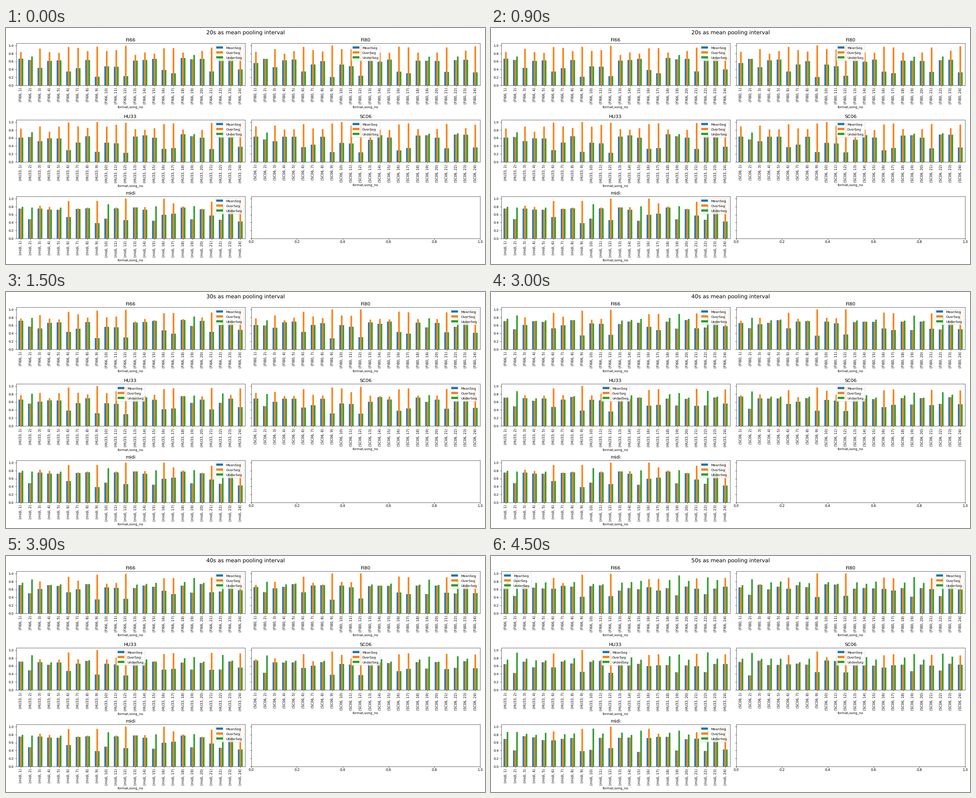
A matplotlib script for the animation above (6000 ms loop, 1064x527 px).

```python
import matplotlib.pyplot as plt
import numpy as np
from matplotlib.animation import FuncAnimation

W, H, DPI = 1064, 527, 53.2
LEFTS, TOPS = (22.5, 544.5), (34.5, 205.5, 376.5)
AX_W, AX_H = 508.5, 93.5
STEPS = 4
SONGS = np.arange(1, 25)
SERIES = ("MeanSeg", "OverSeg", "UnderSeg")

# Song types: (songs, (over, under) at 20s, (over, under) at 50s).
# The first entry of each list covers every song not named later.
RECORDED = [
    (SONGS, (.83, .64), (.64, .79)),
    ((3, 7, 10, 11), (.90, .46), (.72, .72)),
    ((6, 16, 17, 21, 24), (.95, .34), (.88, .61)),
    ((9, 12), (.99, .22), (.99, .42)),
    ((2, 19, 22), (.64, .72), (.44, .91)),
]
MIDI = [
    (SONGS, (.77, .75), (.71, .82)),
    ((6, 16, 17, 21), (.94, .60), (.88, .72)),
    ((9, 12, 24), (.99, .43), (.99, .43)),
    ((2, 10, 15, 19, 22), (.49, .83), (.41, .92)),
]

# Legend place at each step: left, center or right.
LEGEND = {"FI66": "rrrl", "FI80": "crrr", "HU33": "rccc",
          "SC06": "crcc", "midi": "rrrr"}
PANELS = list(LEGEND)
PLACES = {"l": "upper left", "c": "upper center", "r": "upper right"}


def scores(index, step):
    is_midi = PANELS[index] == "midi"
    # Midi holds still until the last interval.
    progress = step // (STEPS - 1) if is_midi else step / (STEPS - 1)
    data = np.empty((2, len(SONGS)))
    for songs, first, last in MIDI if is_midi else RECORDED:
        first, last = np.array(first), np.array(last)
        value = first + (last - first) * progress
        data[:, np.array(songs) - 1] = value[:, None]
    data += np.random.default_rng(index).normal(0, .03, data.shape)
    over, under = np.clip(data, 0, 1)
    return np.minimum(over, under), over, under


def add_axes(index):
    row, col = divmod(index, 2)
    return fig.add_axes([LEFTS[col] / W, 1 - (TOPS[row] + AX_H) / H,
                         AX_W / W, AX_H / H])


def style_y(ax, index):
    ax.set_ylim(0, 1.05)
    ax.set_yticks(np.arange(6) / 5)
    ax.tick_params(axis="y", labelleft=index % 2 == 0)


def draw_panel(ax, index, step):
    name = PANELS[index]
    ax.clear()
    width = 0.5 / 3
    for k, (label, values) in enumerate(zip(SERIES, scores(index, step))):
        ax.bar(SONGS + (k - 1) * width, values, width, label=label,
               snap=False)
    ax.set_xlim(0.5, 24.5)
    ax.set_xticks(SONGS, [f"({name}, {n})" for n in SONGS], rotation=90)
    style_y(ax, index)
    ax.set_xlabel("format,song_no")
    ax.set_title(name, fontsize=14)
    ax.legend(loc=PLACES[LEGEND[name][step]], labelspacing=0.55)


def update(step):
    heading.set_text(f"{20 + 10 * step}s as mean pooling interval")
    for index in range(len(PANELS)):
        draw_panel(axes[index], index, step)
    return []


plt.rcParams.update({"font.family": "DejaVu Sans", "font.size": 10,
                     "xtick.labelsize": 10.3, "text.hinting": "none"})
fig = plt.figure(figsize=(W / DPI, (H + 0.01) / DPI), dpi=DPI,
                 facecolor="white")
heading = fig.text(0.5, 1 - 10.5 / H, "", fontsize=16.2,
                   ha="center", va="center")
axes = [add_axes(i) for i in range(6)]
style_y(axes[5], 5)
axes[5].set_xticks(np.arange(6) / 5)

anim = FuncAnimation(fig, update, frames=STEPS, interval=1500,
                     init_func=lambda: update(0), repeat=True,
                     repeat_delay=0, blit=False)
plt.show()
```
